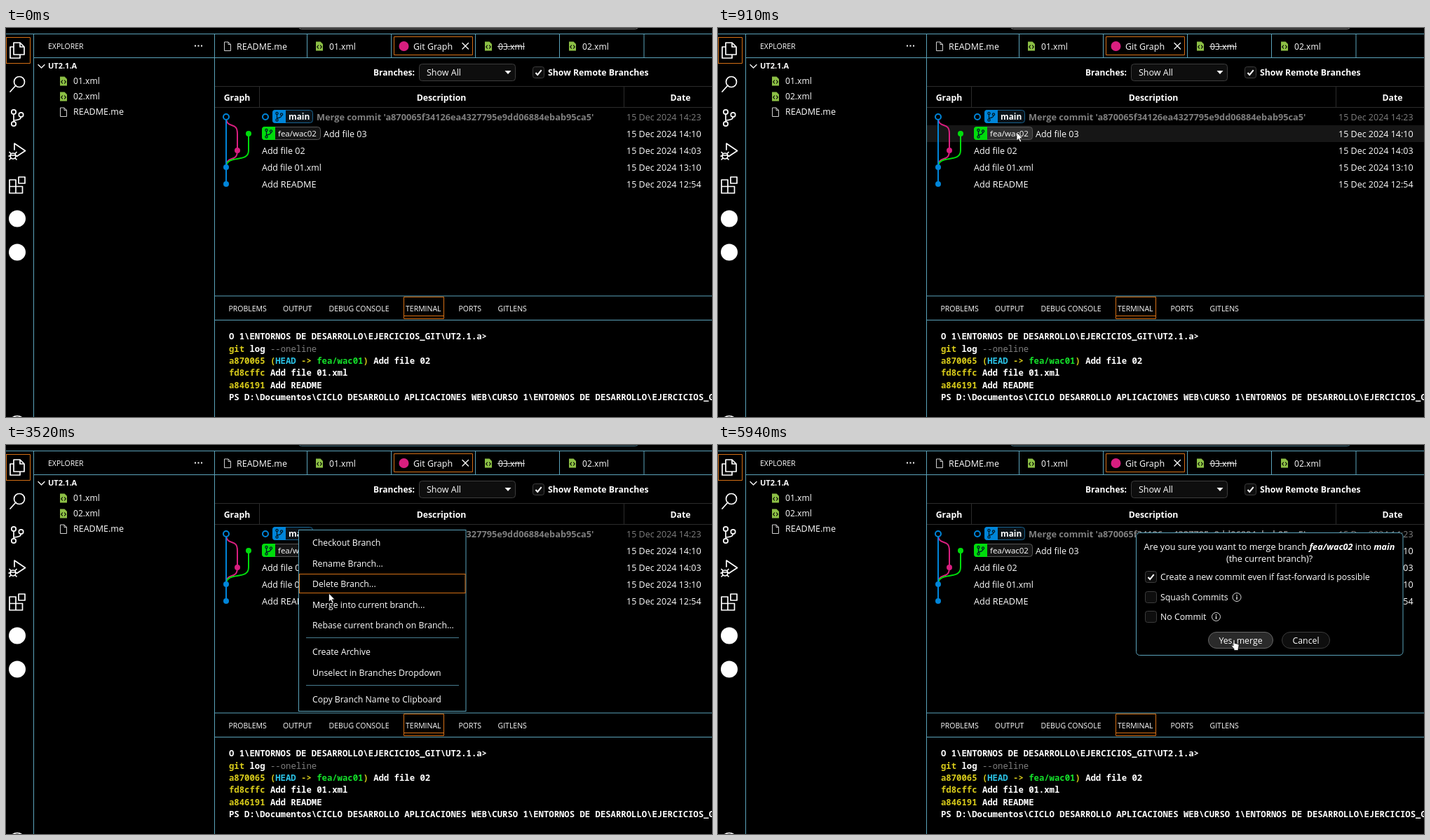
Animation of 1007x556 px, one loop 8 s. Source, as an HTML page:

```html
<!DOCTYPE html>
<html lang="en">
<head>
<meta charset="utf-8">
<title>Merging a branch</title>
<style>
html, body { margin: 0; width: 100%; height: 100%; overflow: hidden; background: #000; }
svg { display: block; width: 100%; height: 100%; }
text { font: 12.5px "Open Sans", "Noto Sans", sans-serif; fill: #fff; white-space: pre; }
.bold text, text.bold { font-weight: 700; font-size: 12.3px; }
.caps text { font-size: 10.5px; }
.menu text, .dialog text { font-size: 12.3px; }
.dialog .ask { font-size: 12.65px; }
text.xml { font-size: 12.1px; }
.term text { font: 600 12.27px "Noto Sans Mono", "DejaVu Sans Mono", monospace; }
.term .b { font-weight: 700; }
.term .dim { font-weight: 400; }
.mid { text-anchor: middle; }
.edge { fill: none; stroke: #5ba3bb; }
.focus { fill: none; stroke: #d46f15; }
.rule { fill: none; stroke: #2b2b2b; }
.icon { fill: none; stroke: #fff; stroke-width: 1.7; stroke-linejoin: round; stroke-linecap: round; }
.thin { stroke-width: 1.3; }
.wire { fill: none; stroke-width: 2; }
.box { fill: #0e0e0e; stroke: #3c3c3c; }
.y { fill: #d8cb1a; }
.dim { fill: #7f7f7f; }
.hidden { display: none; }
</style>
</head>
<body>
<svg viewBox="0 0 1007 556">
  <defs>
    <g id="xml">
      <path d="M-5-6.5H1.5L5-3V6.5H-5Z" fill="#8cbf45"/>
      <path d="M-1.2-1.5L-3.2 1L-1.2 3.5M1.2-1.5L3.2 1L1.2 3.5" fill="none" stroke="#000" stroke-width="1.2"/>
    </g>
    <path id="doc" d="M-4.5-6H1L4.5-2.5V6.5H-4.5ZM1-6V-2.5H4.5" fill="none" stroke="#d0d0d0"/>
    <g id="branch" fill="none" stroke="#001a26" stroke-width="1.3">
      <circle cx="-3" cy="-4.5" r="1.6"/><circle cx="3.5" cy="-3" r="1.6"/><circle cx="-3" cy="5" r="1.6"/>
      <path d="M-3-3V3.5M3.5-1.5Q3.5 1.5-3 2.5"/>
    </g>
    <path id="tick" d="M-4 0L-1.3 3L4.2-3.8" fill="none" stroke="#fff" stroke-width="2"/>
    <g id="info">
      <circle r="6" fill="none" stroke="#ddd"/>
      <path d="M0-1V3.5M0-3.5V-2" stroke="#ddd" stroke-width="1.5"/>
    </g>
    <path id="arrow" d="M0 0V12L2.8 9.5L4.8 14L6.8 13L4.8 8.8H8.5Z" fill="#fff" stroke="#000" stroke-width=".7"/>
    <path id="hand" d="M-1 1Q0-.8 1 1V5.5L6 6.5Q7.3 7 7 9L6 13.5V15.5H0V13.5L-3.8 9Q-3.8 7-1 9Z" fill="#fff" stroke="#000" stroke-width=".7"/>
  </defs>
  <rect width="1007" height="556"/>

  <!-- window frame -->
  <rect id="search" x="417.5" y="-18" width="484" height="19.5" rx="4" fill="#161616"/>
  <path class="edge" d="M0 8.5H1007M39.5 8V556M297.5 8V556M40 42.5H1007M429.5 8V42M549.5 8V42M669.5 8V42M789.5 8V42M910 8V42M298 383H1007M298 417.5H1007"/>
  <path class="focus" d="M0 13.5H34.5V50.5H0M.5 13V51M553.5 12.5H665.5V38.5H553.5ZM567.5 384.5H624.5V415.5H567.5ZM568 411.5H624"/>

  <!-- activity bar -->
  <g class="icon">
    <path d="M11 21H20L26 27V38H11ZM20 21V27H26M11 27H6V43H20V38"/>
    <path d="M14 82L6 91"/><circle cx="19" cy="77" r="7.5"/>
    <circle cx="11" cy="120" r="3.2"/><circle cx="11" cy="137" r="3.2"/><circle cx="21.5" cy="124" r="3.2"/>
    <path d="M11 123.5V133.5M21.5 127.5Q21 131.5 11 132"/>
    <path d="M12 174V165L27.5 175.5L16 183"/><circle cx="10" cy="183" r="4"/>
    <path d="M7 179.5L5 177.5M13 179.5L15 177.5M6 183H4M14 183H16M7 186L5 188M13 186L15 188M6 182H14"/>
    <path d="M5 217H14V236H5ZM5 226.5H23.5V236H14M18 213H27V222H18Z"/>
    <circle cx="16" cy="565.5" r="11"/>
  </g>
  <circle cx="16" cy="272.5" r="12" fill="#fff"/>
  <circle cx="16" cy="320.5" r="12" fill="#fff"/>

  <!-- explorer -->
  <g class="caps"><text x="60" y="30">EXPLORER</text></g>
  <path d="M269 25.5H271M273.5 25.5H275.5M278 25.5H280" stroke="#fff" stroke-width="2"/>
  <path class="icon thin" d="M46 52.5L50.5 57L55 52.5"/>
  <text class="bold" style="font-size:11px" x="60" y="58">UT2.1.A</text>
  <use href="#xml" x="82" y="76"/><text class="xml" x="96" y="80">01.xml</text>
  <use href="#xml" x="82" y="98"/><text class="xml" x="96" y="102">02.xml</text>
  <use href="#doc" x="82" y="120"/><text x="96" y="124">README.me</text>

  <!-- tabs -->
  <use href="#doc" x="316" y="26"/><text x="329" y="30.5">README.me</text>
  <use href="#xml" x="447" y="26"/><text class="xml" x="461" y="30.5">01.xml</text>
  <circle cx="567.5" cy="26" r="7" fill="#d81e7f"/><text x="581" y="30.5">Git Graph</text>
  <path class="icon thin" d="M651 21.5L659.5 30M659.5 21.5L651 30"/>
  <use href="#xml" x="688" y="26"/><text class="xml" x="702" y="30.5">03.xml</text>
  <path d="M701 26.5H740" stroke="#ddd"/>
  <use href="#xml" x="808" y="26"/><text class="xml" x="822" y="30.5">02.xml</text>

  <!-- graph header -->
  <g class="bold">
    <text x="524" y="68" style="font-size:12px">Branches:</text>
    <text x="773" y="68">Show Remote Branches</text>
    <text class="mid" x="329.5" y="103.5">Graph</text>
    <text class="mid" x="621" y="103.5">Description</text>
    <text class="mid" x="962" y="103.5">Date</text>
  </g>
  <rect class="box" x="589.5" y="51.5" width="137" height="24" rx="4"/>
  <text x="600" y="68">Show All</text>
  <path d="M711.5 61H720.5L716 66Z" fill="#fff"/>
  <rect class="box" x="751.5" y="55.5" width="16" height="16" rx="3"/><use href="#tick" x="759.5" y="64"/>
  <path class="rule" d="M298 83.5H1007M298 113.5H1007M361.5 84V113M881.5 84V113"/>

  <!-- commits -->
  <rect id="hover" x="298" width="709" height="24" fill="#161616"/>
  <path class="wire" stroke="#d81e7f" d="M314 127C314 146.2 330 131.8 330 151V175C330 194.2 314 179.8 314 199"/>
  <path class="wire" stroke="#00dc0c" d="M346 151V175C346 194.2 314 179.8 314 199"/>
  <path class="wire" stroke="#0085d9" d="M314 127V223"/>
  <g fill="#0085d9"><circle cx="314" cy="199" r="4"/><circle cx="314" cy="223" r="4"/></g>
  <circle cx="330" cy="175" r="4" fill="#d81e7f"/><circle cx="346" cy="151" r="4" fill="#00dc0c"/>
  <g stroke="#0085d9" stroke-width="2"><circle cx="314" cy="127" r="4"/><circle cx="370" cy="127" r="4"/></g>

  <rect x="380.5" y="117.5" width="57" height="18" rx="4" fill="#0a1319" stroke="#17618f"/>
  <path d="M399 117H384Q380 117 380 121V132Q380 136 384 136H399Z" fill="#0085d9"/>
  <use href="#branch" x="389.5" y="126.5"/>
  <text class="bold" style="font-size:11.9px" x="403" y="130.5">main</text>
  <text class="bold dim" style="font-size:12.75px" x="443" y="131.5">Merge commit 'a870065f34126ea4327795e9dd06884ebab95ca5'</text>
  <rect id="badge" x="365.5" y="141.5" width="83" height="18" rx="4" stroke="#555"/>
  <path d="M384 141H369Q365 141 365 145V156Q365 160 369 160H384Z" fill="#00dc0c"/>
  <use href="#branch" x="374.5" y="150.5"/>
  <text x="388" y="154.5" style="font-size:11.5px">fea/wac02</text>
  <text x="453" y="155.5">Add file 03</text>
  <text x="365" y="179.5">Add file 02</text>
  <text x="365" y="203.5" style="font-size:12.3px">Add file 01.xml</text>
  <text x="365" y="227.5" style="font-size:12.7px">Add README</text>
  <g id="dates"></g>

  <!-- panel -->
  <g class="caps">
    <text x="317.5" y="405">PROBLEMS</text><text x="395" y="405">OUTPUT</text>
    <text x="460.5" y="405">DEBUG CONSOLE</text><text x="570" y="405">TERMINAL</text>
    <text x="645.5" y="405">PORTS</text><text x="701.5" y="405">GITLENS</text>
  </g>
  <g class="term">
    <text x="318" y="445">O 1\ENTORNOS DE DESARROLLO\EJERCICIOS_GIT\UT2.1.a&gt;</text>
    <text x="318" y="462.5"><tspan class="y b">git</tspan> <tspan class="b">log</tspan> <tspan class="dim">--oneline</tspan></text>
    <text x="318" y="479.5"><tspan class="y">a870065 (</tspan><tspan class="b" fill="#2bc4e8">HEAD</tspan><tspan class="y"> -&gt; </tspan><tspan class="b" fill="#14e02a">fea/wac01</tspan><tspan class="y">)</tspan> Add file 02</text>
    <text x="318" y="497"><tspan class="y">fd8cffc</tspan> Add file 01.xml</text>
    <text x="318" y="514.5"><tspan class="y">a846191</tspan> Add README</text>
    <text x="318" y="531.5">PS D:\Documentos\CICLO DESARROLLO APLICACIONES WEB\CURSO 1\ENTORNOS DE DESARROLLO\EJERCICIOS_GIT</text>
  </g>

  <g id="menu" class="menu">
    <rect class="edge" style="fill:#000" x="417.5" y="121.5" width="238.5" height="259"/>
    <path d="M428 275.5H646M428 343.5H646" stroke="#477c8f"/>
    <rect id="choice" class="focus" x="418.5" width="236.5" height="27"/>
  </g>

  <g id="dialog" class="dialog">
    <rect class="edge" style="fill:#000" x="596.5" y="125.5" width="380.5" height="175" rx="5"/>
    <text class="mid ask" x="786.5" y="149.5">Are you sure you want to merge branch <tspan font-weight="700" font-style="italic">fea/wac02</tspan> into <tspan font-weight="700" font-style="italic">main</tspan></text>
    <text class="mid ask" x="786.5" y="166.5">(the current branch)?</text>
    <g class="box">
      <rect x="609.5" y="180.5" width="16" height="16" rx="3"/>
      <rect x="609.5" y="209.5" width="16" height="16" rx="3"/>
      <rect x="609.5" y="237.5" width="16" height="16" rx="3"/>
    </g>
    <use href="#tick" x="617.5" y="189"/>
    <text x="631" y="193">Create a new commit even if fast-forward is possible</text>
    <text x="631" y="221.5">Squash Commits</text><use href="#info" x="740" y="217.5"/>
    <text x="631" y="250">No Commit</text><use href="#info" x="710.5" y="245.5"/>
    <rect id="yes" x="699.5" y="267.5" width="92" height="23" rx="11.5" stroke="#666"/>
    <rect x="804.5" y="267.5" width="68" height="23" rx="11.5" fill="#0e0e0e" stroke="#3c3c3c"/>
    <text class="mid" x="745.5" y="283.5">Yes, merge</text>
    <text class="mid" x="838.5" y="283.5">Cancel</text>
  </g>

  <circle id="click" r="10" fill="#b5a80c" opacity=".85"/>
  <use id="cursor" href="#arrow"/>
</svg>
<script>
const LOOP = 8000;
const $ = id => document.getElementById(id);
const show = (id, on) => $(id).classList.toggle('hidden', !on);

function addText(parent, x, y, str, cls = '') {
  const el = document.createElementNS('http://www.w3.org/2000/svg', 'text');
  el.setAttribute('x', x);
  el.setAttribute('y', y);
  el.setAttribute('class', cls);
  el.textContent = str;
  parent.append(el);
}

['14:23', '14:10', '14:03', '13:10', '12:54'].forEach((clock, i) =>
  addText($('dates'), 885, 131.5 + 24 * i, '15 Dec 2024 ' + clock, i ? '' : 'dim'));

const menuItems = [
  ['Checkout Branch', 144], ['Rename Branch...', 173.5], ['Delete Branch...', 203],
  ['Merge into current branch...', 232.5], ['Rebase current branch on Branch...', 262],
  ['Create Archive', 300], ['Unselect in Branches Dropdown', 329.5], ['Copy Branch Name to Clipboard', 367.5]
];
menuItems.forEach(([label, y]) => addText($('menu'), 437, y, label));

// Each move spreads its steps evenly from start to end along the points.
const moves = [
  { start: 310, end: 1110, steps: 13, path: [[688, 470], [668, 400], [640, 325], [604, 258], [554, 205],
    [515, 185], [485, 170], [460, 160], [440, 153], [426, 149], [422, 148], [420, 147], [419, 146]] },
  { start: 2960, end: 3670, steps: 11, path: [[424, 146], [433, 153], [446, 175], [457, 203], [464, 221], [466, 228]] },
  { start: 5050, end: 5810, steps: 12, path: [[474, 229], [510, 234], [575, 246], [645, 259], [700, 270], [728, 276], [736, 278]] }
];

function cursorAt(t) {
  const move = moves.filter(m => t >= m.start).pop();
  if (!move) return null;
  const { start, end, steps, path } = move;
  const step = Math.floor((t - start) / (end - start) * (steps - 1) + 0.001);
  const pos = Math.min(step / (steps - 1), 1) * (path.length - 1);
  const i = Math.min(Math.floor(pos + 1e-6), path.length - 2);
  return [0, 1].map(k => path[i][k] + (path[i + 1][k] - path[i][k]) * (pos - i));
}

function render(t) {
  const at = cursorAt(t);
  const [x, y] = at || [0, 0];
  const menuOpen = t >= 1910 && t < 4670;
  const dialogOpen = t >= 4670;
  const clicking = (t >= 1640 && t < 1910) || (t >= 4520 && t < 4670);
  const row = Math.floor((y + 8 - 139) / 24);
  const onRow = at && t < 1910 && row >= 0 && row < 4;
  const onBadge = at && t < 1910 && x < 430;
  const onYes = dialogOpen && x > 699 && y > 267;

  show('menu', menuOpen);
  show('dialog', dialogOpen);
  show('click', clicking);
  show('cursor', at);
  show('hover', onRow);
  $('search').setAttribute('stroke', t < 1640 ? '#777' : '#38687c');
  $('hover').setAttribute('y', 139 + 24 * row);
  $('badge').setAttribute('fill', onBadge ? '#303030' : '#151515');
  $('yes').setAttribute('fill', onYes ? '#2a2a2a' : '#0e0e0e');
  const item = Math.max(0, Math.floor((y - 124.5) / 29.5));
  $('choice').setAttribute('y', 125.5 + 29.5 * item);

  const hand = onYes || (onRow && !onBadge);
  const nudge = onYes && t < 5940 ? 1 : 0;
  $('cursor').setAttribute('href', hand ? '#hand' : '#arrow');
  $('cursor').setAttribute('transform', `translate(${x + nudge} ${y})`);
  $('click').setAttribute('cx', x);
  $('click').setAttribute('cy', y);
}

const began = performance.now();
function tick() {
  render((performance.now() - began) % LOOP);
  requestAnimationFrame(tick);
}
tick();
</script>
</body>
</html>
```
